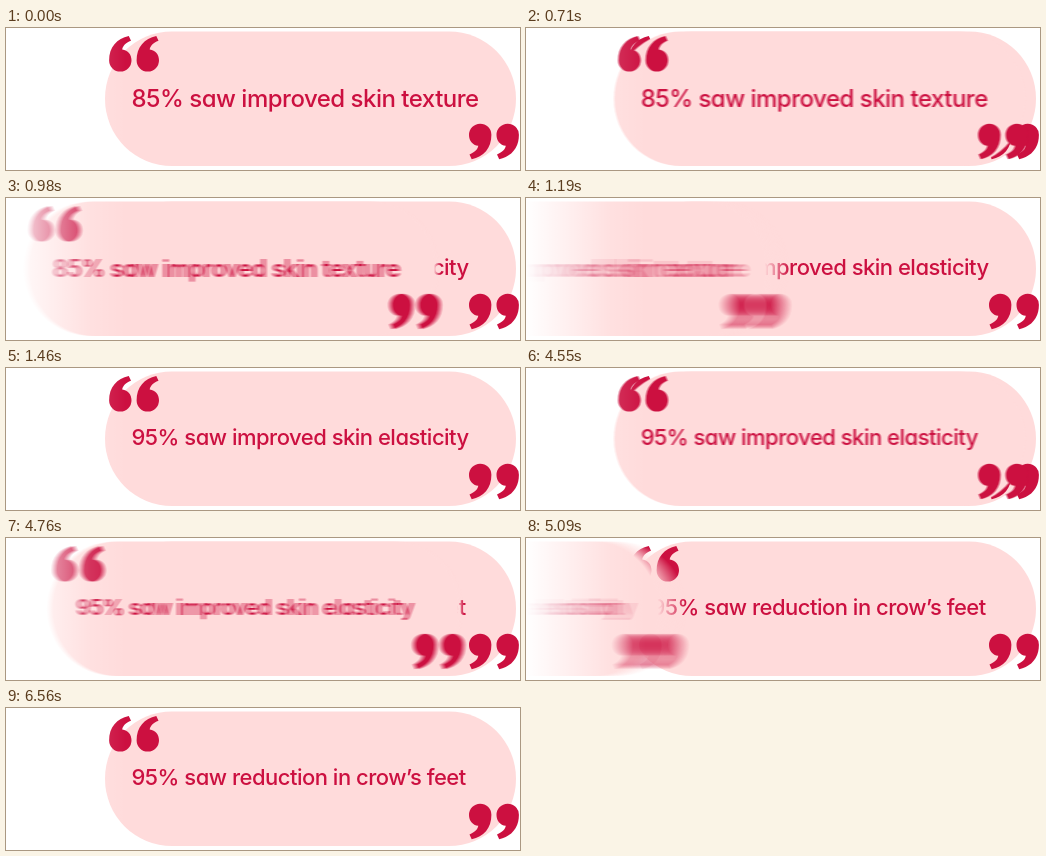
Animation of 514x142 px, one loop 8000 ms. Source, as an HTML page:

```html
<!DOCTYPE html>
<html lang="en">
<head>
<meta charset="utf-8">
<style>
  html, body { margin: 0; width: 100%; height: 100%; overflow: hidden; background: #fff; }
  svg { display: block; width: 514px; height: 142px; }
  text { font: 450 22px Inter, "Open Sans", sans-serif; font-feature-settings: "cv11"; letter-spacing: -.5px; }
</style>
</head>
<body>
<svg viewBox="0 0 514 142" fill="#cc1040">
  <defs>
    <path id="mark" d="M19.8 0 L22 4.8 C16.5 7 13.8 10 13.2 13.4 C19 14 22.5 18.5 22.5 24.2 A11.2 11.2 0 0 1 .1 24.5 C0 11 8 2.5 19.8 0Z"/>
    <g id="quotes"><use href="#mark" x="103" y="8"/><use href="#mark" x="130.5" y="8"/></g>
    <g id="card">
      <rect x="99" y="3.5" width="411" height="134.5" rx="67" fill="#ffdbdb"/>
      <use href="#quotes"/>
      <use href="#quotes" transform="rotate(180 308 69.6)"/>
    </g>
    <linearGradient id="fade">
      <stop stop-color="#fff"/>
      <stop offset=".7" stop-color="#fff" stop-opacity=".15"/>
      <stop offset="1" stop-color="#fff" stop-opacity="0"/>
    </linearGradient>
    <filter id="blur" filterUnits="userSpaceOnUse" x="-40" y="0" width="600" height="142" color-interpolation-filters="sRGB">
      <feConvolveMatrix id="kernel" order="1 1" kernelMatrix="1" edgeMode="none" preserveAlpha="false"/>
    </filter>
  </defs>
  <g><use href="#card"/><text id="nextText" x="125.5"></text></g>
  <g id="leaving"><g id="slide"><use href="#card"/><text id="text" x="125.5"></text></g></g>
  <rect width="120" height="142" fill="url(#fade)"/>
</svg>
<script>
const LOOP = 8000, MOVE = 1000, DISTANCE = 525, STEP = 30, SHUTTER = 15;
const lines = [
  { text: "85% saw improved skin texture", size: 24, y: 78.5 },
  { text: "95% saw improved skin elasticity", size: 22, y: 77 },
  { text: "95% saw reduction in crow’s feet", size: 22, y: 77 }
];
const starts = [500, 4340];
const el = id => document.getElementById(id);

// Cubic Bézier easing (.92, 0, .593, 1), solved by bisection
function ease(x) {
  if (x <= 0) return 0;
  if (x >= 1) return 1;
  let lo = 0, hi = 1, s;
  for (let i = 0; i < 30; i++) {
    s = (lo + hi) / 2;
    const px = 2.76 * s * (1 - s) ** 2 + 1.78 * s * s * (1 - s) + s ** 3;
    if (px < x) lo = s; else hi = s;
  }
  return s * s * (3 - 2 * s);
}

const offset = ms => DISTANCE * ease(ms / MOVE);

function setLine(node, { text, size, y }) {
  node.textContent = text;
  node.style.fontSize = size + "px";
  node.setAttribute("y", y);
}

function draw(t) {
  const index = starts.filter(s => t >= s + MOVE).length;
  const elapsed = Math.max(0, Math.floor((t - starts[index]) / STEP) * STEP || 0);
  const smear = offset(elapsed + SHUTTER / 2) - offset(elapsed - SHUTTER / 2);
  const size = elapsed ? 2 * Math.round(smear / 2) + 1 : 1;

  setLine(el("text"), lines[index]);
  setLine(el("nextText"), lines[Math.min(index + 1, 2)]);
  el("slide").setAttribute("transform", `translate(${-offset(elapsed)} 0)`);
  el("kernel").setAttribute("order", `${size} 1`);
  el("kernel").setAttribute("kernelMatrix", Array(size).fill(1).join(" "));
  if (size > 1) el("leaving").setAttribute("filter", "url(#blur)");
  else el("leaving").removeAttribute("filter");
  // The card underneath only shows while the top one slides away
  el("nextText").parentNode.style.display = elapsed ? "" : "none";
}

function tick() {
  draw(performance.now() % LOOP);
  requestAnimationFrame(tick);
}
tick();
</script>
</body>
</html>
```
